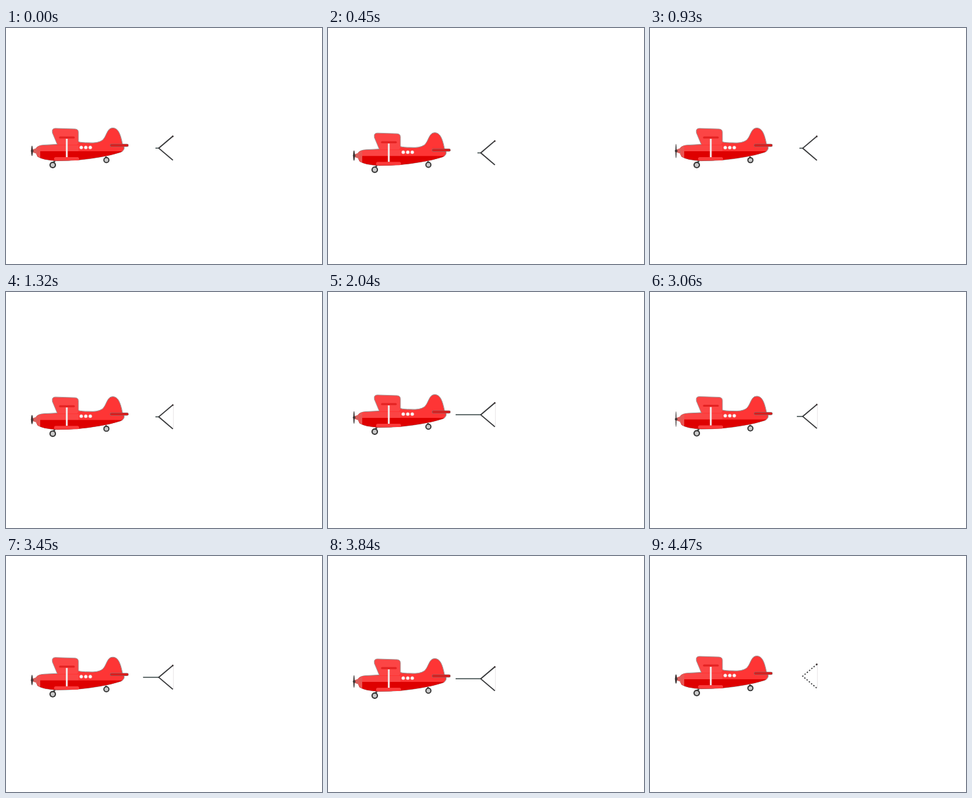
Write an HTML page that moves like this. It is 480 px wide and 360 px high and loops after 4500 ms.

```html
<!DOCTYPE html>
<html lang="en">
<head>
<meta charset="utf-8">
<title>Biplane towing a line</title>
<style>
html, body { margin: 0; width: 100%; height: 100%; overflow: hidden; background: #fff; }
svg { display: block; width: 100vw; height: 100vh; }
</style>
</head>
<body>
<svg viewBox="0 0 480 360">
  <defs>
    <path id="hull" d="M46 183Q49 179 58 178.500L78 177.500L110 173.500Q114 175 126 175Q139 176 146 171.500C153 166 153 152.500 162 152.500C171 152.500 174 163 177 177L179.500 182Q180 187 174 189.500Q160 194 142 197Q112 202.500 78 202.500Q56 201.500 48 196Q44 189 46 183Z"/>
    <clipPath id="inside"><use href="#hull"/></clipPath>
    <g id="wheel">
      <circle r="5" fill="#353535"/>
      <circle r="3.100" fill="#c9c9c9"/>
    </g>
  </defs>
  <g id="bob">
    <path d="M70 209L75 201M152 201V196" stroke="#484848" stroke-width="2.500"/>
    <use href="#wheel" x="71" y="209"/>
    <use href="#wheel" transform="translate(152.500 201.500) scale(.94)"/>

    <use href="#hull" fill="#fe3535" stroke="#969090" stroke-width="1"/>
    <g clip-path="url(#inside)">
      <path d="M40 179H110V188H40Z" fill="#fb4444"/>
      <path d="M40 188H190V210H40Z" fill="#de0000"/>
      <path d="M40 174H52V204H40Z" fill="#ea5552"/>
    </g>
    <path d="M78 178L70.500 160Q69 153 75 153L105 154Q110 154.500 110 159V175L108 178Z" fill="#fc4545"/>
    <path d="M78 178L70.500 160Q69 153 75 153L105 154Q110 154.500 110 159V173" fill="none" stroke="#969090" stroke-width=".800"/>
    <g stroke-linecap="round" fill="none">
      <path d="M82 167H103" stroke="#e42222" stroke-width="3"/>
      <path d="M160 179H184" stroke="#777" stroke-width="4.500"/>
      <path d="M160 179H184" stroke="#d91d1d" stroke-width="3.500"/>
      <path d="M75.500 199.500H108.500" stroke="#fb3b3b" stroke-width="5"/>
    </g>
    <path d="M92.300 169V197" stroke="#f3e8e8" stroke-width="2.800"/>
    <g fill="#fff" stroke="#e6b5b5" stroke-width=".500">
      <circle cx="114.300" cy="182.300" r="2.500"/>
      <circle cx="121.200" cy="182.300" r="2.500"/>
      <circle cx="128" cy="182.300" r="2.500"/>
    </g>

    <path d="M40 185.500L47 183V192L40 189.500Z" fill="#d9605c"/>
    <ellipse id="blades" cx="39.500" cy="187.500" fill="#3b3535"/>
    <circle cx="39.700" cy="187.500" r="2" fill="#403838"/>

    <path id="edge" d="M254.300 166V201" stroke="#e7e3e6" stroke-width=".900"/>
    <path id="rope" stroke="#3e4c4c" stroke-width="1.500"/>
    <path id="fork" d="M253.500 165L232 183.300L253.500 201.700" fill="none" stroke="#353638" stroke-width="1.700"/>
    <circle id="knot" cx="253.300" cy="165.300" r="1.300" fill="#443a3a"/>
  </g>
</svg>
<script>
const LOOP = 4500, BOB = 900, SPIN = 150, TAU = 2 * Math.PI;
const part = id => document.getElementById(id);
const [bob, blades, rope, fork, edge] =
  ['bob', 'blades', 'rope', 'fork', 'edge'].map(part);

function draw(now) {
  const t = now % LOOP;
  const phase = TAU * t / BOB;
  bob.setAttribute('transform', `translate(0 ${3.6 * (1 - Math.cos(phase))})`);

  const spin = Math.cos(TAU * (t - 55) / SPIN);
  blades.setAttribute('ry', 9.5 + 2.5 * spin);
  blades.setAttribute('rx', 1.1 - 0.4 * spin);

  // The line shows most while the plane passes mid-height.
  const left = 227 - 34 * Math.sin(phase) ** 4;
  rope.setAttribute('d', `M${left} 183.300H232`);

  const broken = t >= 4440;
  rope.setAttribute('opacity', broken ? 0 : 1);
  fork.setAttribute('stroke-dasharray', broken ? '2 2.500' : 'none');
  edge.setAttribute('opacity', t >= 1110 ? 1 : 0);
}

function tick() {
  draw(performance.now());
  requestAnimationFrame(tick);
}
tick();
</script>
</body>
</html>
```
